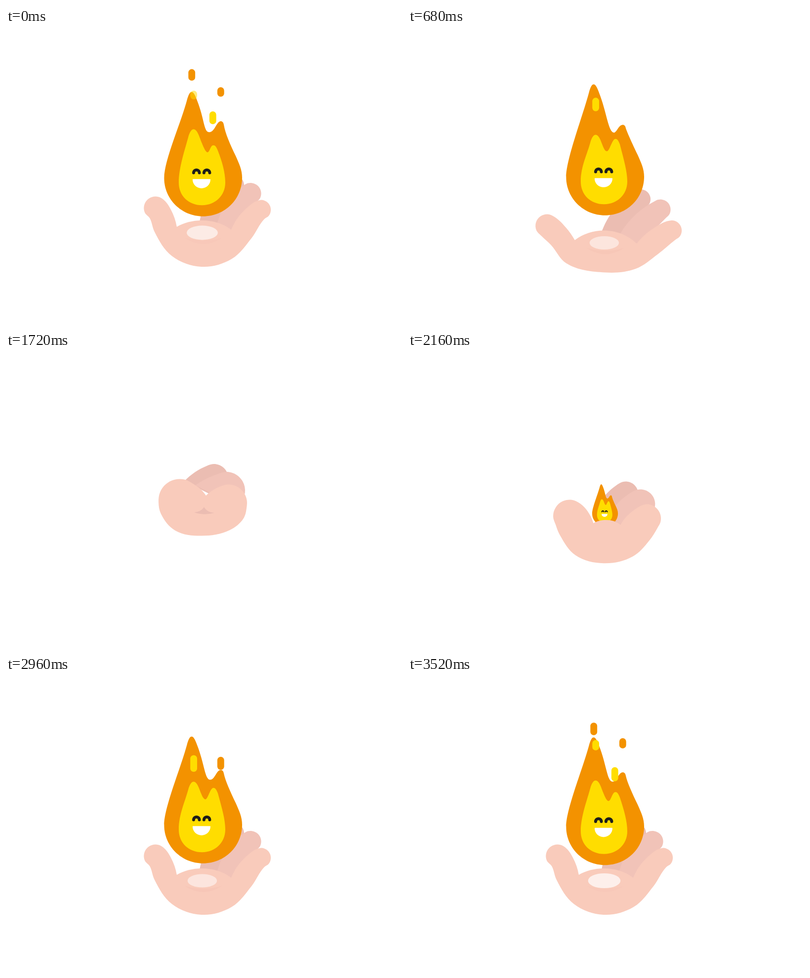
These frames come from a looping animation (800x600 px, 3.56 s). An HTML page with a canvas:

```html
<!DOCTYPE html>
<html lang="en">
<head>
<meta charset="utf-8">
<title>Flame in hand</title>
<style>
html, body { margin: 0; width: 100%; height: 100%; overflow: hidden; background: #fff; }
canvas { display: block; width: 800px; height: 600px; }
</style>
</head>
<body>
<canvas id="stage" width="800" height="600"></canvas>
<script>
const ctx = document.getElementById('stage').getContext('2d');
const LOOP = 3560, STEP = 40, CYCLE = 400, RESTART = 2360;
const ORANGE = '#f39200', YELLOW = '#ffdd00', INK = '#1d1d1b';
const SKIN = '#f9cbbb', MID = '#f1c3b8', DARK = '#ebbdb2';

// Tips are circles [x, y, r]; the thumb and front finger add the angle where
// the tip meets the outer edge, the other fingers add their two roots.
const relaxed = {
  thumb: [302, 365, 23.5, -240], front: [515, 368.5, 20, 70],
  inner: [[345, 403], [333, 368]], outer: [[300, 413], [335, 462], [395, 484], [456, 468], [496, 426]],
  web: [[481, 370], [455, 409]], palm: 390,
  mid: [494, 335.5, 21.5, 426, 400, 458, 420], back: [460, 319, 21, 390, 400, 432, 410]
};
const open = {
  thumb: [281, 401, 23.5, -240], front: [532.5, 410.5, 20.5, 70],
  inner: [[337, 430], [319, 404.5]], outer: [[289, 440], [320, 477], [398, 495.5], [460, 488], [504, 459]],
  web: [[496, 406], [462, 437]], palm: 410.5,
  mid: [510, 368, 20.5, 428, 418, 465, 440], back: [470, 347, 20, 390, 417, 436, 425]
};
const fist = {
  thumb: [351, 300.5, 43, -185], front: [449, 306.5, 38, 10],
  inner: [[404, 291], [393, 278]], outer: [[313, 328], [342, 362], [395, 372.5], [452, 361], [480, 337]],
  web: [[425, 276], [404, 291]], palm: 291,
  mid: [445, 281, 38, 383, 270, 460, 310], back: [420, 256, 29, 360, 262, 436, 300]
};

// A drop rises and slows down: y = top + k * (stop - age)^2.
const drops = [
  { x: 375.3, color: ORANGE, born: 290, top: 43, stop: 710, end: 560, grow: 5.3 },
  { x: 433.8, color: ORANGE, born: 130, top: 109.3, stop: 560, end: 520, grow: 3.6, until: 500 },
  { x: 417.8, color: YELLOW, born: 300, top: 111.3, stop: 710, end: 580, grow: 6.2 },
  { x: 379.2, color: YELLOW, born: 130, top: 126, stop: 440, end: 435, grow: 8 }
];
const puffs = [
  { x: 397.3, y: 260, rise: 70, w: 11, h: 18, color: ORANGE },
  { x: 378.5, y: 288, rise: 45, w: 11, h: 18, color: ORANGE },
  { x: 412.5, y: 279, rise: 45, w: 6.5, h: 15, color: YELLOW }
];

const clamp = v => Math.max(0, Math.min(1, v));
const ramp = (t, a, b) => clamp((t - a) / (b - a));
const ease = (t, a, b) => { const u = ramp(t, a, b); return u * u * (3 - 2 * u); };
const slow = s => 1 - (1 - s) ** 2;
const wave = (t, peak) => Math.cos((t - peak) / CYCLE * 2 * Math.PI);

function mix(a, b, u) {
  if (typeof a === 'number') return a + (b - a) * u;
  if (Array.isArray(a)) return a.map((v, i) => mix(v, b[i], u));
  return Object.fromEntries(Object.keys(a).map(k => [k, mix(a[k], b[k], u)]));
}

function arc(x, y, r, from, to, n = 6) {
  return Array.from({ length: n }, (_, i) => {
    const a = (from + (to - from) * i / (n - 1)) * Math.PI / 180;
    return [x + r * Math.cos(a), y + r * Math.sin(a)];
  });
}

// Smooth curve through points; the ends bend like circle arcs.
function smooth(pts) {
  const unit = ([x, y]) => { const l = Math.hypot(x, y) || 1; return [x / l, y / l]; };
  const last = pts.length - 1;
  const chords = pts.slice(1).map((p, i) => unit([p[0] - pts[i][0], p[1] - pts[i][1]]));
  const mirror = (t, c) => {
    const d = 2 * (t[0] * c[0] + t[1] * c[1]);
    return [d * c[0] - t[0], d * c[1] - t[1]];
  };
  const tan = pts.map((_, i) => i && i < last
    ? unit([chords[i - 1][0] + chords[i][0], chords[i - 1][1] + chords[i][1]]) : null);
  tan[0] = mirror(tan[1], chords[0]);
  tan[last] = mirror(tan[last - 1], chords[last - 1]);
  return pts.slice(1).reduce((path, q, i) => {
    const p = pts[i], l = Math.hypot(q[0] - p[0], q[1] - p[1]) / 2.9;
    const [a, b] = [tan[i], tan[i + 1]];
    return path + `C${p[0] + a[0] * l} ${p[1] + a[1] * l} ${q[0] - b[0] * l} ${q[1] - b[1] * l} ${q[0]} ${q[1]}`;
  }, `M${pts[0][0]} ${pts[0][1]}`);
}

function fingerPath([x, y, r, lx, ly, rx, ry]) {
  return smooth([[lx, ly], ...arc(x, y, r, -118, 60), [rx, ry]]) + 'Z';
}

function handPath({ thumb, front, inner, outer, web, palm }) {
  const [tx, ty, tr, turn] = thumb, [fx, fy, fr, start] = front;
  const edge = smooth([...inner, ...arc(tx, ty, tr, -50, turn), ...outer, ...arc(fx, fy, fr, start, -90), ...web]);
  const [lx, ly] = inner[0], [rx, ry] = web[1];
  const pull = .28 * (rx - lx), cy = (palm - (ly + ry) / 8) / .75;
  return edge + `C${rx - pull} ${cy} ${lx + pull} ${cy} ${lx} ${ly}Z`;
}

function fill(path, color, alpha = 1) {
  if (alpha <= 0) return;
  ctx.globalAlpha = alpha;
  ctx.fillStyle = color;
  ctx.fill(new Path2D(path));
  ctx.globalAlpha = 1;
}

function pill(x, y, w, h, color, alpha = 1) {
  if (w <= 0 || h <= 0 || alpha <= 0) return;
  ctx.globalAlpha = alpha;
  ctx.fillStyle = color;
  ctx.beginPath();
  ctx.roundRect(x - w / 2, y - h / 2, w, h, Math.min(w, h) / 2);
  ctx.fill();
  ctx.globalAlpha = 1;
}

function shifted(dy, paint) {
  ctx.save();
  ctx.translate(0, dy);
  paint();
  ctx.restore();
}

function drawFace() {
  fill('M378 299H412Q413 299 413 300A18 17.6 0 0 1 377 300Q377 299 378 299Z', '#fff');
  ctx.strokeStyle = INK;
  ctx.lineWidth = 6;
  ctx.lineCap = 'round';
  for (const x of [379, 399.9])
    ctx.stroke(new Path2D(`M${x} 286.2a5.8 5.8 0 0 1 11.6 0`));
}

function drawFlame(ph, dy, scale) {
  if (scale <= 0) return;
  const w = wave(ph, 85), v = wave(ph, 55);
  const tip = 120 + 11 * w, side = 183.5 - 7.5 * w, nx = 411.5 - 4.5 * w, ny = 204.5 - 2.3 * w;
  const left = 203.5 - 8.5 * v, right = 226 + 7 * v, ix = 405 + 3.2 * v, iy = 244.6;
  ctx.save();
  ctx.translate(398, 340 + dy);
  ctx.scale(scale, scale);
  ctx.translate(-398, -340);
  fill(`M375 ${tip}C371 ${tip} 369 ${tip + 6} 366.5 ${tip + 13}
    C354 ${tip + 62} 319.5 260 319.5 297C319.5 340 355 374.5 398 374.5
    C442 374.5 477 340 477 296C477 280 471 268 464 252
    C453 229 443 207 440 ${side + 7}C439 ${side + 2} 437 ${side} 434 ${side}
    C425 ${side} 422 ${ny} ${nx} ${ny}C${nx - 11} ${ny} 401 ${tip + 55} 386 ${tip + 17}
    C382 ${tip + 6} 379 ${tip} 375 ${tip}Z`, ORANGE);
  fill(`M379 ${left}C374.5 ${left} 371.5 ${left + 6} 369 ${left + 13}
    C362 ${left + 40} 349 275 349 306C349 333 369 352 396 352
    C423 352 443 332 443 306C443 285 436 262 428 ${right + 11}
    C425 ${right + 3} 422.5 ${right} 419 ${right}C412.5 ${right} ${ix + 5} ${iy} ${ix} ${iy}
    C${ix - 5} ${iy} 395 ${left + 26} 389 ${left + 11}C386 ${left + 4} 383 ${left} 379 ${left}Z`, YELLOW);
  drawFace();
  ctx.restore();
}

function drawDrops(t, closing) {
  if (closing ? t > 840 : t < 2300) return;
  const clock = closing ? t : t - RESTART;
  for (const d of drops) {
    const k = d.color === ORANGE ? .00042 : .0006;
    for (let base = -CYCLE; base <= clock; base += CYCLE) {
      const age = clock - base;
      if (age < d.born || age >= d.end) continue;
      if (closing && base + d.born > d.until) continue;
      const top = d.top + k * (d.stop - age) ** 2;
      const h = 15 + d.grow * (d.end - age) / 100;
      pill(d.x, top + h / 2, 13.8, h, d.color, ramp(age, d.end, d.end - 70));
    }
  }
}

function drawPuffs(t) {
  const s = (t - 960) / 280;
  if (s <= 0 || s >= 1) return;
  const size = Math.min(1, (1 - s) / .4);
  for (const p of puffs)
    pill(p.x, p.y - p.rise * slow(s), p.w * size, p.h * size, p.color);
}

function drawBurst(t) {
  const s = (t - 2320) / 160;
  if (s <= 0 || s >= 1) return;
  const r = 26.5 * slow(s), size = Math.min(1, (1 - s) / .25);
  const thick = 5.5 * size, long = 11 * size;
  for (const side of [-1, 1]) {
    pill(373 + side * r, 371, long, thick, YELLOW);
    pill(373, 371.5 + side * r, thick, long, YELLOW);
  }
}

function drawPalm(dy, alpha) {
  fill('M360 425Q399 437 437 425Q399 451 360 425Z', '#f4c1b3', alpha * (.8 - .06 * dy));
  const rx = 25 + .88 * dy, ry = 11.2 + .44 * dy;
  fill(`M${396.5 - rx} 415a${rx} ${ry} 0 0 1 ${2 * rx} 0a${rx} ${ry} 0 0 1 ${-2 * rx} 0Z`,
    '#fff', alpha * (.22 + .055 * dy));
}

function draw(t) {
  const closing = t < 1600;
  const widen = ease(t, 360, 680), grip = ease(t, 780, 1040), release = ease(t, 2000, 2320);
  const pose = t < 780 ? mix(relaxed, open, widen)
    : t < 2000 ? mix(open, fist, grip) : mix(fist, relaxed, release);
  const closed = t < 2000 ? grip : 1 - release;
  const sink = grip * 14.5 * (Math.max(0, 1720 - Math.max(t, 1040)) / 640) ** 2;

  const ph = closing ? t : t - RESTART;
  const lift = closing ? 3.5 * ease(t, 480, 680) : 3.6 * (1 - ease(t, 2440, 2640));
  const dy = 6.3 + 3.05 * wave(ph, 321) - lift;
  const scale = closing ? 1 - ramp(t, 760, 960) ** 2 : slow(ramp(t, 2120, 2340));

  ctx.fillStyle = '#fff';
  ctx.fillRect(0, 0, 800, 600);
  shifted(sink, () => {
    fill(fingerPath(pose.back), DARK);
    fill(fingerPath(pose.mid), MID);
  });
  drawFlame(ph, dy, scale);
  drawDrops(t, closing);
  drawPuffs(t);
  shifted(sink, () => {
    fill(handPath(pose), SKIN);
    fill('M380 325Q394 324 400 314.5Q406 325 421 326Q400 332 380 325Z', DARK, ramp(closed, .7, 1));
  });
  shifted(closing ? 20.5 * widen : 0, () => drawPalm(dy, clamp(1 - 2 * closed)));
  drawBurst(t);
}

const start = performance.now();
function tick() {
  const t = (performance.now() - start) % LOOP;
  draw(Math.floor(t / STEP) * STEP);
  requestAnimationFrame(tick);
}
tick();
</script>
</body>
</html>
```
